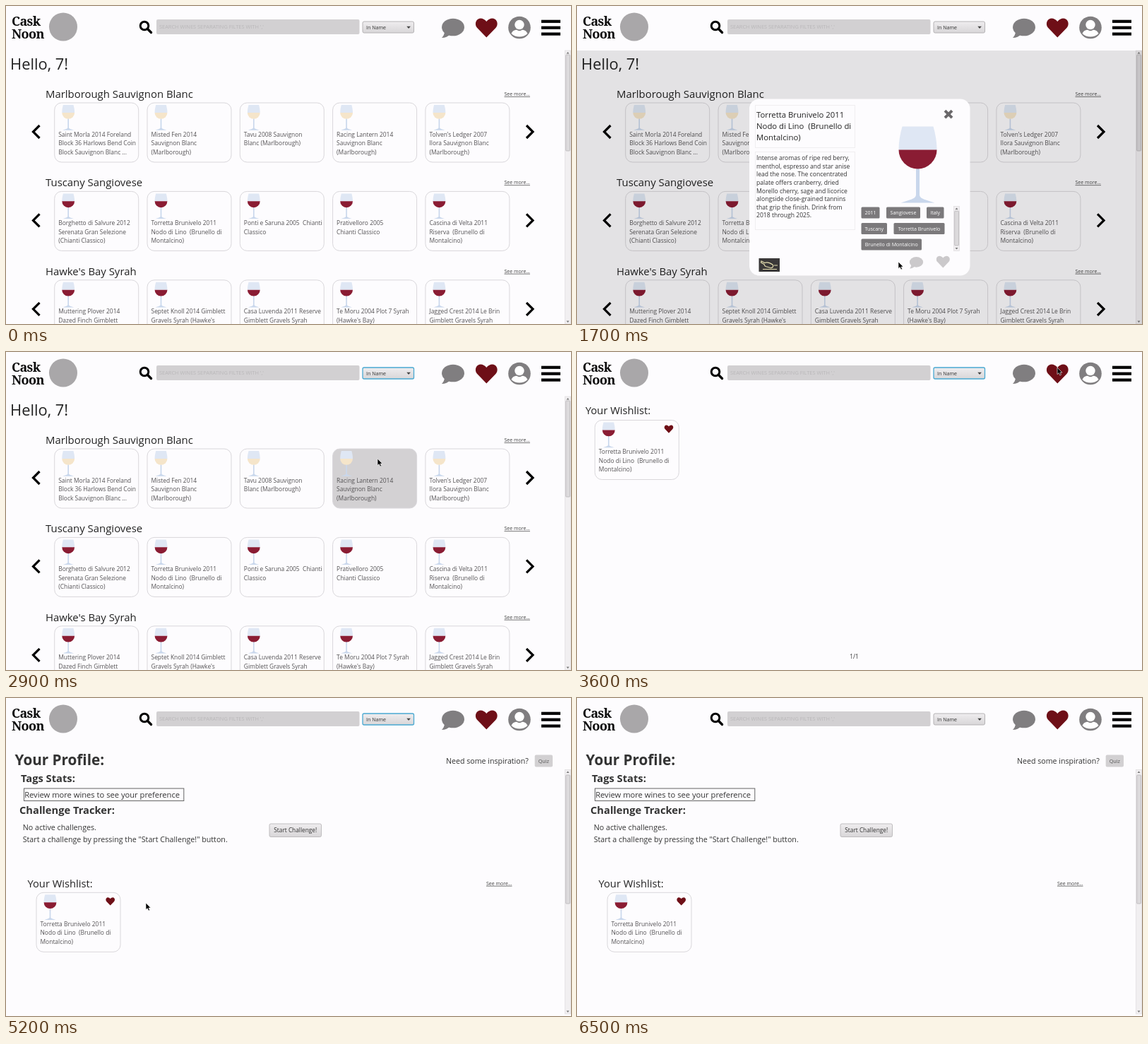
An HTML page that plays this animation: 800x450 px, repeating every 6600 ms.

```html
<!DOCTYPE html>
<html lang="en">
<head>
<meta charset="utf-8">
<title>Wine browser</title>
<style>
  html, body { margin: 0; width: 800px; height: 450px; overflow: hidden; background: #fdfcfe; }
  svg { display: block; }
  text { font-family: "Open Sans", "Noto Sans", sans-serif; white-space: pre; }
  .logo { font-family: "Noto Serif", "Liberation Serif", serif; font-weight: 900; letter-spacing: -.6px; }
  .b { font-weight: 700; }
  .u { text-decoration: underline; }
</style>
</head>
<body>
<svg id="stage" width="800" height="450" viewBox="0 0 800 450"></svg>
<script>
const RED = '#6e0f17', GREY = '#807e80', PALE = '#cbc9cb', INK = '#222', SOFT = '#555355', PAPER = '#fdfcfe';
const CARD_W = 119, CARD_H = 84, LOOP = 6600;

const text = (x, y, size, str, fill = INK, cls = '', anchor = 'start') =>
  `<text x="${x}" y="${y}" font-size="${size}" fill="${fill}" class="${cls}" text-anchor="${anchor}">${str}</text>`;
const lines = (x, y, size, step, rows, fill) =>
  rows.map((row, i) => text(x, y + i * step, size, row, fill)).join('');
const rect = (x, y, w, h, fill, stroke = 'none', r = 0, extra = '') =>
  `<rect x="${x}" y="${y}" width="${w}" height="${h}" rx="${r}" fill="${fill}" stroke="${stroke}" ${extra}/>`;
const path = (d, fill, extra = '') => `<path d="${d}" fill="${fill}" ${extra}/>`;
const at = (x, y, scale, body) => `<g transform="translate(${x} ${y}) scale(${scale})">${body}</g>`;
const group = (id, body) => `<g id="${id}">${body}</g>`;

const heart = (x, y, scale, fill, id = '') => at(x, y, scale,
  path('M0 14L-13.5 0C-17-4-16.5-10-12.5-12.7C-8.5-15.3-3.5-13.5 0-9.3C3.5-13.5 8.5-15.3 12.5-12.7C16.5-10 17-4 13.5 0Z', fill, id && `id="${id}"`));

const bubble = (x, y, scale, fill) => at(x, y, scale,
  `<ellipse cy="-1" rx="16" ry="12.3" fill="${fill}"/>` + path('M-12 4C-12 9-14 12-16 14C-11 14-7 12-4 9Z', fill));

const glass = (x, y, scale, wine) => at(x, y, scale,
  path('M-2.5 58H2.5V97C3 103 13 104 24 108H-24C-13 104-3 103-2.5 97Z', '#c9d7ec') +
  path('M-22 0H22C25 11 27 21 27 33H-27C-27 21-25 11-22 0Z', '#dfe7f4') +
  path('M-27 33H27A27 27 0 0 1-27 33Z', wine));

const RED_WINE = '#8a1c33', WHITE_WINE = '#f5e5ca';

const card = (x, y, rows, wine, id = '') =>
  rect(x, y, CARD_W, CARD_H, PAPER, '#d9d7db', 10, id && `id="${id}"`) +
  glass(x + 19.5, y + 3, .33, wine) + lines(x + 5.5, y + 47.6, 8.45, 12.5, rows, SOFT);

const scrollbar = (x, top, bottom, thumbTop, thumbEnd) => {
  const mid = x + 4;
  return rect(x, top, 8, bottom - top, '#f1eff1', '#dedcde', 0, 'stroke-width=".7"') +
    rect(x + 1.2, thumbTop, 5.8, thumbEnd - thumbTop, '#dcdadc', '#b9b7b9', 1, 'stroke-width=".8"') +
    path(`M${mid - 2} ${top + 4.5}h4l-2-2.5zM${mid - 2} ${bottom - 4.5}h4l-2 2.5z`, '#777');
};

const button = (x, y, w, h, size, label) =>
  rect(x, y, w, h, 'url(#btn)', '#b9b7b9', 2, 'stroke-width=".9"') +
  text(x + w / 2, y + h / 2 + size * .36, size, label, '#333', '', 'middle');

const seeMore = (x, y) => text(x, y, 7, 'See more...', '#444', 'u');

const FAVOURITE = ['Torretta Brunivelo 2011', 'Nodo di Lino  (Brunello di', 'Montalcino)'];

const shelves = [
  ['Marlborough Sauvignon Blanc', WHITE_WINE, [
    ['Saint Morla 2014 Foreland', 'Block 36 Harlows Bend Coin', 'Block Sauvignon Blanc ...'],
    ['Misted Fen 2014', 'Sauvignon Blanc', '(Marlborough)'],
    ['Tavu 2008 Sauvignon', 'Blanc (Marlborough)'],
    ['Racing Lantern 2014', 'Sauvignon Blanc', '(Marlborough)'],
    ["Tolven's Ledger 2007", 'Ilora Sauvignon Blanc', '(Marlborough)']]],
  ['Tuscany Sangiovese', RED_WINE, [
    ['Borghetto di Salvure 2012', 'Serenata Gran Selezione', '(Chianti Classico)'],
    FAVOURITE,
    ['Ponti e Saruna 2005  Chianti', 'Classico'],
    ['Prativelloro 2005', 'Chianti Classico'],
    ['Cascina di Velta 2011', 'Riserva  (Brunello di', 'Montalcino)']]],
  ["Hawke's Bay Syrah", RED_WINE, [
    ['Muttering Plover 2014', 'Dazed Finch Gimblett'],
    ['Septet Knoll 2014 Gimblett', "Gravels Syrah (Hawke's"],
    ['Casa Luvenda 2011 Reserve', 'Gimblett Gravels Syrah'],
    ['Te Moru 2004 Plot 7 Syrah', "(Hawke's Bay)"],
    ['Jagged Crest 2014 Le Brin', 'Gimblett Gravels Syrah']]]
];
const cardX = i => 68.7 + i * 131.3, cardY = r => 137 + r * 125.4;

const header =
  text(8, 28, 18, 'Cask', '#0a0a0a', 'logo') + text(8, 46, 18, 'Noon', '#0a0a0a', 'logo') +
  '<circle cx="81" cy="29.5" r="20" fill="#a9a7a9"/>' +
  '<circle cx="196" cy="28" r="5.8" fill="none" stroke="#000" stroke-width="3"/>' +
  path('M200.5 32.5L205.5 37.5', 'none', 'stroke="#000" stroke-width="3.4" stroke-linecap="round"') +
  rect(213, 19, 287.5, 21, '#d2d0d2', 'none', 2) +
  text(217, 32.3, 7.4, "SEARCH WINES SEPARATING FILTES WITH ','", '#b9b7b9') +
  rect(505, 22, 72.5, 16, 'url(#btn)', '#b5b3b5', 2, 'id="combo"') +
  text(510, 32.6, 7.1, 'In Name', '#333') + path('M567.3 28.8h5.6l-2.8 3.2z', '#444') +
  bubble(633, 31, 1, GREY) + heart(680.3, 31, .97, RED) +
  `<circle cx="727" cy="30.5" r="15.8" fill="${GREY}"/><circle cx="727" cy="26.5" r="6.7" fill="#fff"/>` +
  path('M715.5 39C717.5 34.5 721 33.8 723 33.8Q727 36.5 731 33.8C733 33.8 736.5 34.5 738.5 39C732.5 45 721.5 45 715.5 39Z', '#fff') +
  [19.7, 28.6, 37.5].map(y => rect(758, y, 27, 4.2, '#000')).join('');

const chevrons = y => path(`M47.5 ${y - 9}L38.5 ${y}L47.5 ${y + 9}M737 ${y - 9}L746 ${y}L737 ${y + 9}`,
  'none', 'stroke="#000" stroke-width="3.2"');

const home = text(6, 90, 21.9, 'Hello, 7!') +
  shelves.map(([title, wine, wines], r) => {
    const y = cardY(r);
    return text(56, y - 7, 14.9, title) + seeMore(705.5, y - 10) + chevrons(y + 41) +
      wines.map((rows, i) => card(cardX(i), y, rows, wine, `card${r}${i}`)).join('');
  }).join('') + scrollbar(791.5, 63, 450, 69, 205);

const tag = (x, y, w, label) => rect(x, y, w, 16, '#7b797b', 'none', 1.5) +
  text(x + w / 2, y + 10.5, 7.1, label, '#fff', '', 'middle');

const popup = rect(0, 63, 800, 387, '#000', 'none', 0, 'opacity=".1"') +
  rect(244, 131.5, 312.5, 250, PAPER, 'none', 14) +
  rect(252.5, 140.5, 141, 60, 'none', '#f0eef0') + rect(252.5, 206.5, 141, 110, 'none', '#f0eef0') +
  lines(254, 157.7, 11.33, 15.9, FAVOURITE) +
  lines(254, 218.2, 8.6, 11.6, ['Intense aromas of ripe red berry,', 'menthol, espresso and star anise',
    'lead the nose. The concentrated', 'palate offers cranberry, dried', 'Morello cherry, sage and licorice',
    'alongside close-grained tannins', 'that grip the finish. Drink from', '2018 through 2025.'], '#333') +
  path('M521 148.2L531 158.2M531 148.2L521 158.2', 'none', 'stroke="#6a686a" stroke-width="4"') +
  glass(482.5, 170.5, 1, RED_WINE) +
  tag(402.5, 284.5, 26, '2011') + tag(438, 284.5, 48, 'Sangiovese') + tag(495, 284.5, 24.5, 'Italy') +
  tag(402.5, 307, 36.5, 'Tuscany') + tag(448.5, 307, 72, 'Torretta Brunivelo') +
  tag(402.5, 329.5, 85.5, 'Brunello di Montalcino') +
  scrollbar(533.5, 283.5, 346.5, 290, 339) +
  rect(257.5, 357, 29.5, 19, '#3a3838') +
  path('M261 361L266 363.5C269 362 274 364 277 366C279 368 277 371 274 370.5L267 368.5C265.5 367.5 265.5 366.5 265 365.5L260.5 363Z', 'none', 'stroke="#e6dfb0" stroke-width="1.2"') +
  path('M263 372.5H283M279 367H284', 'none', 'stroke="#e6dfb0" stroke-width="1.2"') +
  bubble(480.5, 363, .6, PALE) + heart(518.3, 362, .6, PALE, 'like');

const saved = (x, y) => card(x, y, FAVOURITE, RED_WINE) + heart(x + 104.7, y + 12.6, .4, RED);

const wishlist = text(12, 87.5, 14.7, 'Your Wishlist:') + saved(25.3, 96.5) +
  text(392.5, 434.2, 8.2, '1/1', '#333', '', 'middle');

const profile = text(12.5, 95, 20.7, 'Your Profile:', '#333', 'b') +
  text(21, 119, 14.7, 'Tags Stats:', '#333', 'b') +
  rect(25.5, 128, 226.3, 17.5, 'none', '#666') +
  text(26.2, 141, 11.16, 'Review more wines to see your preference', '#333') +
  text(19, 164, 14.7, 'Challenge Tracker:', '#333', 'b') +
  lines(23.7, 186.8, 10.7, 17, ['No active challenges.', 'Start a challenge by pressing the "Start Challenge!" button.'], '#333') +
  button(373, 178, 73.5, 18.5, 8.3, 'Start Challenge!') +
  text(623, 92.6, 10.63, 'Need some inspiration?', '#333') +
  rect(748.7, 80.5, 25.3, 17, '#d2d0d2', 'none', 2) + text(761.3, 91.7, 7.2, 'Quiz', '#555', '', 'middle') +
  text(30.5, 267.8, 14.7, 'Your Wishlist:') + seeMore(680, 264.8) +
  saved(43, 275.3) + scrollbar(791.5, 101.5, 447, 109, 291);

document.getElementById('stage').innerHTML =
  '<defs><linearGradient id="btn" x2="0" y2="1"><stop stop-color="#efedef"/><stop offset="1" stop-color="#d8d6d8"/></linearGradient></defs>' +
  group('home', home) + group('popup', popup) + group('wishlist', wishlist) + group('profile', profile) + header +
  group('cursor', path('M0 0V9.6L2.2 7.6L3.8 11L5.5 10.2L4 7H7Z', '#000', 'stroke="#fff" stroke-width=".6"'));

const el = id => document.getElementById(id);
const show = (id, on) => el(id).setAttribute('visibility', on ? 'visible' : 'hidden');

// Pointer stops: time, x, y
const stops = [
  [100, 345, 446], [500, 300, 360], [900, 281, 310], [1300, 281, 310], [1700, 455, 362],
  [2000, 517, 361], [2300, 517, 361], [2700, 526, 151], [2900, 526, 151], [3500, 680, 22],
  [3700, 680, 22], [4200, 165, 163], [4600, 726, 32], [4800, 726, 32], [5200, 198, 290],
  [5700, 100, 355], [6200, 414, 190], [LOOP, 414, 190]
];

function pointer(t) {
  const i = Math.max(1, stops.findIndex(s => s[0] > t));
  const [t0, x0, y0] = stops[i - 1], [t1, x1, y1] = stops[i];
  const k = Math.min(1, Math.max(0, (t - t0) / (t1 - t0))), e = k * k * (3 - 2 * k);
  return [x0 + (x1 - x0) * e, y0 + (y1 - y0) * e];
}

function draw(t) {
  const [x, y] = pointer(t);
  const inside = t >= 100 && t < 6400;
  const modal = t >= 1200 && t < 2900;
  const focus = t >= 2900 && t < 6400;
  show('home', t < 3600);
  show('popup', modal);
  show('wishlist', t >= 3600 && t < 4800);
  show('profile', t >= 4800);
  show('cursor', inside);
  el('cursor').setAttribute('transform', `translate(${x} ${y})`);
  el('like').setAttribute('fill', t >= 2100 ? RED : PALE);
  el('combo').setAttribute('stroke', focus ? '#4aa9d2' : '#b5b3b5');
  el('combo').setAttribute('stroke-width', focus ? 1.3 : 1);
  shelves.forEach((shelf, r) => shelf[2].forEach((_, i) => {
    const dx = x - cardX(i), dy = y - cardY(r);
    const over = inside && !modal && dx > 0 && dx < CARD_W && dy > 0 && dy < CARD_H;
    el(`card${r}${i}`).setAttribute('fill', over ? '#d3d1d3' : PAPER);
  }));
}

// The picture advances in steps of 100 ms
const start = performance.now();
function tick() {
  draw(Math.floor((performance.now() - start) % LOOP / 100) * 100);
  requestAnimationFrame(tick);
}
tick();
</script>
</body>
</html>
```
